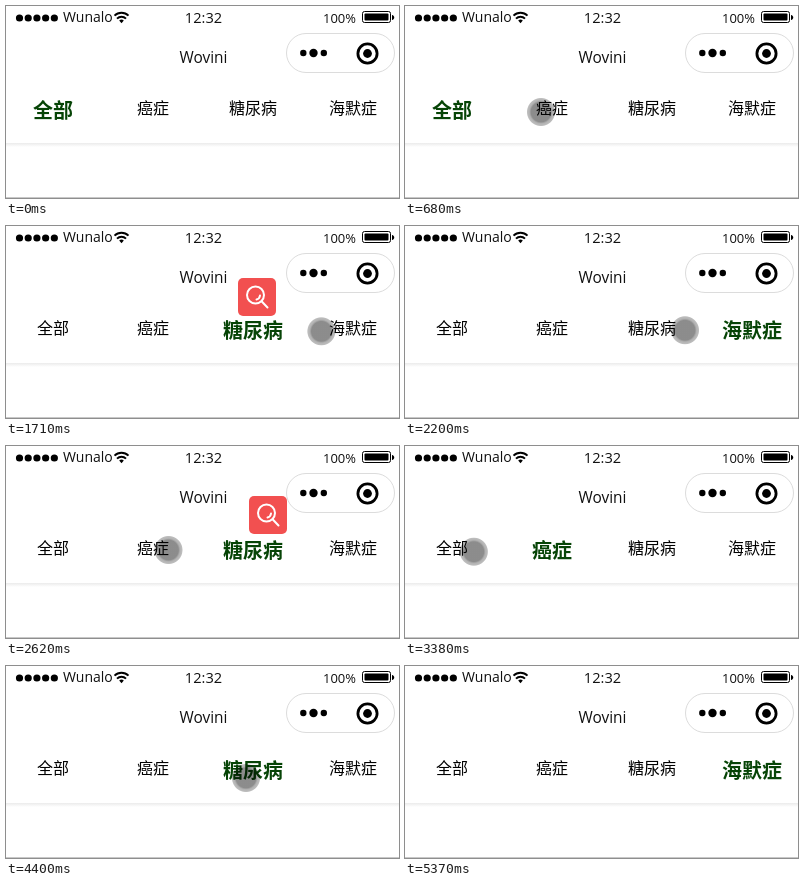
An HTML page that plays this animation: 393 by 192 pixels, repeating every 5770 ms.

```html
<!DOCTYPE html>
<html lang="zh-CN">
<head>
<meta charset="utf-8">
<title>Tabs</title>
<style>
  html, body { margin: 0; width: 100%; height: 100%; overflow: hidden; background: #fff; }
  svg { display: block; width: 393px; height: 192px; }
  text { font-family: "Open Sans", "Noto Sans", sans-serif; fill: #111; }
  .tab { font: 400 16px "Noto Sans CJK SC", "Noto Sans CJK", sans-serif; text-anchor: middle; fill: #000; }
  .tab.on { font-size: 20px; font-weight: 700; fill: #064406; }
</style>
</head>
<body>
<svg viewBox="0 0 393 192">
  <defs>
    <linearGradient id="shade" x2="0" y2="1">
      <stop offset="0" stop-color="#ebebeb"/>
      <stop offset="1" stop-color="#fff"/>
    </linearGradient>
    <radialGradient id="touch">
      <stop offset=".68" stop-opacity=".45"/>
      <stop offset=".8" stop-opacity=".3"/>
      <stop offset=".93" stop-opacity=".26"/>
      <stop offset="1" stop-opacity="0"/>
    </radialGradient>
  </defs>

  <!-- status bar -->
  <path d="M13.5 12H50" stroke="#000" stroke-width="7.2" stroke-linecap="round" stroke-dasharray=".01 8.7"/>
  <text x="57" y="16" font-size="14">Wunalo</text>
  <path d="M108.5 9.6a10 10 0 0 1 14 0M111 12.6a6.5 6.5 0 0 1 9 0" fill="none" stroke="#000" stroke-width="2"/>
  <path d="M115.5 17.2l-2.3-2.6a3.4 3.4 0 0 1 4.6 0z"/>
  <text x="197.5" y="17" font-size="14.6" text-anchor="middle">12:32</text>
  <text x="317" y="17" font-size="13">100%</text>
  <rect x="356.5" y="5.5" width="28" height="11" rx="2" fill="none" stroke="#000"/>
  <rect x="358.5" y="7.5" width="24" height="7" rx="1"/>
  <path d="M386 9c3 .5 3 4.5 0 5z"/>

  <!-- title and capsule -->
  <text x="197.5" y="57" font-size="15.4" text-anchor="middle">Wovini</text>
  <rect x="280.5" y="27.5" width="108" height="39" rx="19.5" fill="#fff" stroke="#dcdcdc"/>
  <circle cx="297.3" cy="47" r="3.2"/>
  <circle cx="307.5" cy="47" r="4.2"/>
  <circle cx="317.8" cy="47" r="3.2"/>
  <circle cx="361.5" cy="47.5" r="9.6" fill="none" stroke="#000" stroke-width="2.8"/>
  <circle cx="361.5" cy="47.5" r="4.4"/>

  <rect y="137" width="393" height="4" fill="url(#shade)"/>
  <rect y="191" width="393" height="1" fill="#c8c8c8"/>

  <g id="tabs"></g>

  <g id="search">
    <rect x="-19" y="-19" width="38" height="38" rx="5" fill="#f25050"/>
    <g fill="none" stroke="#fff" stroke-width="2" stroke-linecap="round">
      <circle cx="-1.5" cy="-2" r="8.5"/>
      <path d="M4.8 4.5L10.5 10.5M3 -1.5a4.6 4.6 0 0 1 -3.5 4"/>
    </g>
  </g>
  <circle id="cursor" r="14.5" fill="url(#touch)"/>
</svg>
<script>
const LOOP = 5770, LEAD = 130, STEP = 68.9;
const GAP = 100, FIRST = 47;

// Pointer stops; a tap selects the nearest tab, a popup tap also opens the search button.
const stop = (step, x, y, action) => ({ step, x, y, action });
const stops = [
  stop(0, 289, 165),
  stop(3, 184, 116),
  stop(5, 184, 116),
  stop(8, 136, 106),
  stop(15, 150, 104, "tap"),
  stop(19, 246, 106, "popup"),
  stop(20, 246, 106),
  stop(27, 349, 105, "tap"),
  stop(33, 257, 104, "popup"),
  stop(39, 131, 104, "tap"),
  stop(41, 131, 104),
  stop(51, 57, 106, "tap"),
  stop(55, 156, 106, "popup"),
  stop(60, 240, 112, "tap"),
  stop(62, 240, 112),
  stop(68, 330, 110),
  stop(71, 330, 110, "tap"),
  stop(76, 390, 180)
];
const END = stops.at(-1).step;

const $ = id => document.getElementById(id);
const easeOut = f => 1 - (1 - f) ** 2;
const nearestTab = x => Math.round((x - FIRST) / GAP);

function place(el, pos) {
  el.setAttribute("visibility", pos ? "visible" : "hidden");
  if (pos) el.setAttribute("transform", `translate(${pos.x} ${pos.y})`);
}

const tabs = ["全部", "癌症", "糖尿病", "海默症"].map((label, i) => {
  const el = document.createElementNS("http://www.w3.org/2000/svg", "text");
  el.textContent = label;
  el.setAttribute("x", FIRST + GAP * i);
  $("tabs").append(el);
  return el;
});

function pointer(k) {
  if (k < 0 || k >= END) return null;
  const i = stops.findIndex(s => s.step > k);
  const a = stops[i - 1], b = stops[i];
  const f = easeOut((k - a.step) / (b.step - a.step));
  return { x: a.x + (b.x - a.x) * f, y: a.y + (b.y - a.y) * f };
}

function draw(ms) {
  // the picture advances in even ticks
  const k = Math.floor((ms - LEAD) / STEP + 0.12);
  const last = stops.findLast(s => s.action && s.step <= k);
  const selected = last ? nearestTab(last.x) : 0;

  tabs.forEach((el, i) => {
    const on = i === selected;
    el.setAttribute("class", on ? "tab on" : "tab");
    el.setAttribute("y", on ? 111.5 : 107.5);
  });

  const open = last?.action === "popup" && k > last.step;
  place($("search"), open ? { x: last.x + 5, y: last.y - 35 } : null);
  place($("cursor"), pointer(k));
}

const start = performance.now();
function tick() {
  draw((performance.now() - start) % LOOP);
  requestAnimationFrame(tick);
}
tick();
</script>
</body>
</html>
```
